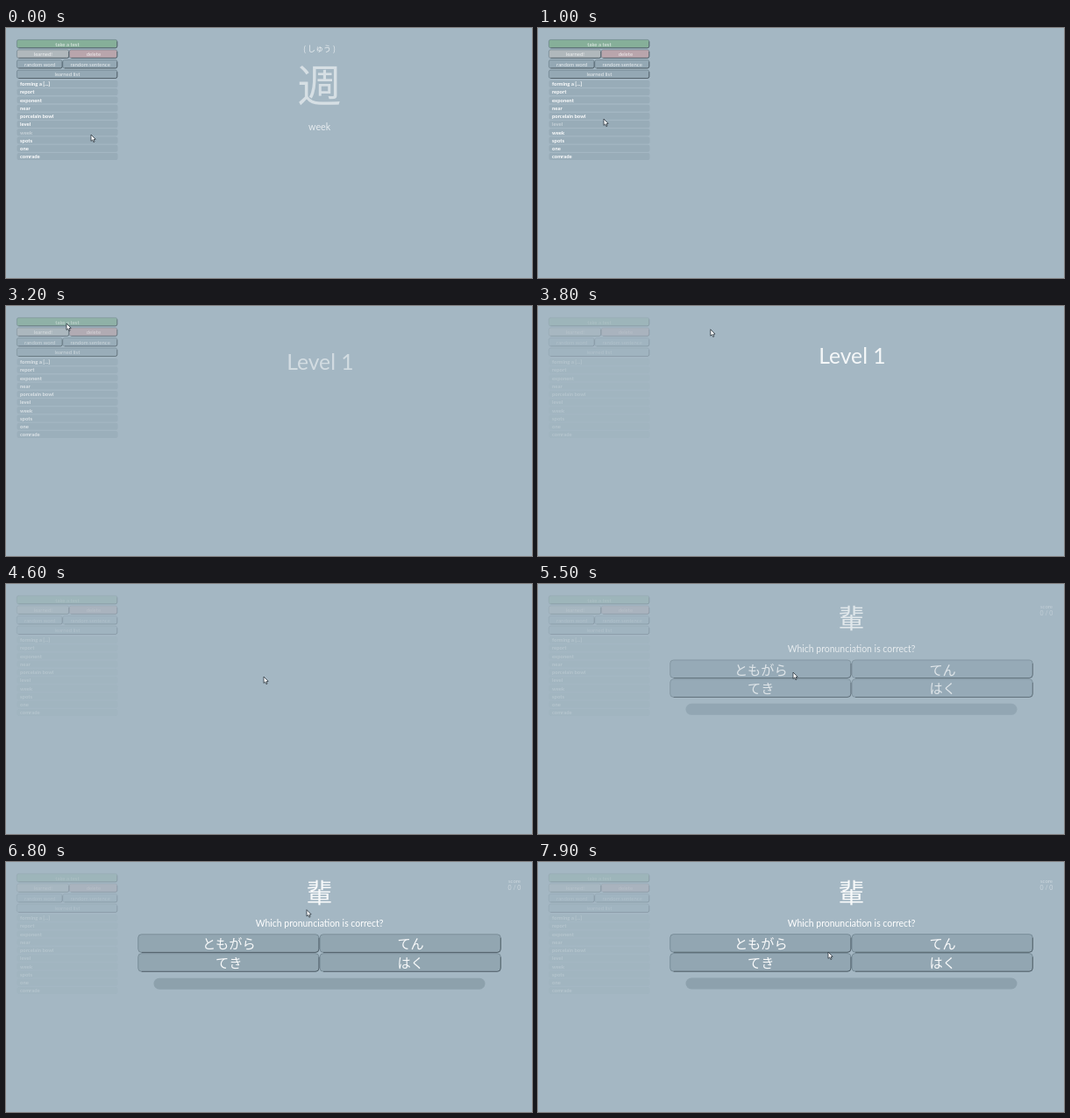
Recreate the animation shown at these times as an HTML page with a canvas. Size 600 by 286 pixels, loop 8000 ms.

```html
<!DOCTYPE html>
<html lang="ja">
<head>
<meta charset="utf-8">
<title>Kanji trainer</title>
<style>
html, body { margin: 0; width: 100%; height: 100%; overflow: hidden; background: #a4b7c3; }
canvas { display: block; width: 600px; height: 286px; }
</style>
</head>
<body>
<canvas id="stage"></canvas>
<script>
const W = 600, H = 286, LOOP = 8000, STEP = 100;
const MID = 357.6;
const LATIN = 'Lato, "Open Sans", sans-serif';
const CJK = '"Noto Sans CJK JP", "Noto Sans CJK", sans-serif';
const SLATE = '#94a8b4';
const canvas = document.getElementById('stage');
const ctx = canvas.getContext('2d');
const ratio = window.devicePixelRatio || 1;
canvas.width = W * ratio;
canvas.height = H * ratio;

const clamp = v => Math.max(0, Math.min(1, v));
const mix = (a, b, k) => a + (b - a) * k;

const menu = [
  [['take a test', '#86af99']],
  [['learned!', '#b0b8bc'], ['delete', '#b9a5ac']],
  [['random word', SLATE], ['random sentence', SLATE]],
  [['learned list', SLATE]]
];
const rows = ['forming a [...]', 'report', 'exponent', 'near', 'porcelain bowl',
  'level', 'week', 'spots', 'one', 'comrade'];
const answers = ['ともがら', 'てん', 'てき', 'はく'];

// Pointer moves: start, end, goal; a bend goes sideways first, then down
const moves = [
  { from: 0, to: 1000, x: 75, y: 104 },
  { from: 1300, to: 2200, x: 69, y: 20 },
  { from: 3200, to: 4600, x: 294, y: 106, bend: 2 },
  { from: 5000, to: 5500, x: 291, y: 101 },
  { from: 5500, to: 6100, x: 338, y: 61 },
  { from: 6500, to: 7400, x: 353, y: 42 },
  { from: 7500, to: 7900, x: 331, y: 103 }
];

function pointerAt(t) {
  let x = 97, y = 122;
  for (const m of moves) {
    const k = clamp((t - m.from) / (m.to - m.from));
    const bend = m.bend || 0;
    x = mix(x, m.x, 1 - (1 - k) ** (1 + bend / 4));
    y = mix(y, m.y, k ** (1 + bend));
  }
  return [x, y];
}

function text(str, x, y, size, { font = LATIN, weight = 400, alpha = 1, align = 'center' } = {}) {
  ctx.font = `${weight} ${size}px ${font}`;
  ctx.textAlign = align;
  ctx.fillStyle = `rgba(255,255,255,${alpha})`;
  ctx.fillText(str, x, y);
}

const kana = (str, x, y, size, alpha) =>
  text(str, x, y, size, { font: CJK, weight: 300, alpha });

function box(x, y, w, h, r, fill) {
  ctx.beginPath();
  ctx.roundRect(x, y, w, h, r);
  ctx.fillStyle = fill;
  ctx.fill();
}

function button(x, y, w, h, r, fill) {
  box(x, y, w, h, r, fill);
  ctx.lineWidth = 0.7;
  ctx.strokeStyle = 'rgba(72,92,102,.55)';
  ctx.stroke();
  // Darker lower and right edges
  ctx.beginPath();
  ctx.moveTo(x + r, y + h);
  ctx.arcTo(x + w, y + h, x + w, y, r);
  ctx.lineTo(x + w, y + r);
  ctx.lineWidth = 0.8;
  ctx.strokeStyle = '#4b5961';
  ctx.stroke();
}

// Fades in while rising and fades out while sinking
function scene(t, start, end, draw) {
  const age = (t - start) / 1000;
  const out = clamp((t - end) / 400);
  if (age <= 0 || out >= 1) return;
  ctx.save();
  ctx.globalAlpha = (1 - Math.exp(-age / 0.42)) * (1 - out);
  ctx.translate(0, 19 * Math.exp(-age / 0.37) + 12 * out * out);
  draw();
  ctx.restore();
}

function word(reading, kanji, meanings) {
  kana(`( ${reading} )`, MID, 22.4, 9, 1);
  text(kanji, MID, 79.5, 50, { font: CJK, alpha: 0.75 });
  meanings.forEach((m, i) => text(m, MID, 113 + i * 13.4, 10.7));
}

function question() {
  text('輩', MID, 46, 30, { font: CJK, alpha: 0.92 });
  text('Which pronunciation is correct?', MID, 74, 10.45);
  answers.forEach((answer, i) => {
    const x = 150.7 + (i % 2) * 207.3;
    const y = 82.6 + (i >> 1) * 21.9;
    button(x, y, 206.3, 20.7, 4, '#92a6b2');
    kana(answer, x + 103.6, y + 16.7, 15.2, 0.95);
  });
  box(168.5, 132.5, 378, 13, 6.5, '#8da1ad');
  text('score', 580, 24, 6, { alpha: 0.45 });
  text('0 / 0', 580, 32, 7, { alpha: 0.45 });
}

function sidebar(t) {
  ctx.save();
  ctx.globalAlpha = 1 - 0.78 * clamp((t - 2800) / 900);
  ctx.font = `400 6px ${LATIN}`;
  menu.forEach((line, n) => {
    // Each button takes its label's width plus an equal share of the spare room
    const widths = line.map(([label]) => ctx.measureText(label).width);
    const spare = (115 - widths.reduce((a, b) => a + b)) / line.length;
    const y = 13.4 + n * 11.57;
    let x = 12.4;
    line.forEach(([label, fill], i) => {
      const w = widths[i] + spare;
      button(x, y, w - 0.6, 9.4, 2, fill);
      text(label, x + w / 2, y + 7.2, 6, { alpha: 0.8 });
      x += w;
    });
  });
  const hovered = t < 500 ? 'week' : t < 1400 ? 'level' : '';
  rows.forEach((label, i) => {
    const y = 60 + i * 9.22;
    box(12.5, y, 115, 7.9, 2, '#98acb8');
    text(label, 16, y + 6.2, 5.9, { align: 'left', weight: 700, alpha: label === hovered ? 0.45 : 1 });
  });
  ctx.restore();
}

function pointer(x, y) {
  ctx.save();
  ctx.translate(x, y);
  ctx.fillStyle = '#fff';
  ctx.strokeStyle = '#26313a';
  ctx.lineWidth = 0.8;
  const arrow = new Path2D('M0 0V7.4L1.7 5.9 2.9 8.6 4.1 8 3 5.5 5.2 5.3Z');
  ctx.fill(arrow);
  ctx.stroke(arrow);
  ctx.restore();
}

function render(t) {
  ctx.setTransform(ratio, 0, 0, ratio, 0, 0);
  ctx.fillStyle = '#a4b7c3';
  ctx.fillRect(0, 0, W, H);
  sidebar(t);
  scene(t, -560, 600, () => word('しゅう', '週', ['week']));
  scene(t, 1250, 2300, () => word('ち', '値', ['level', 'value']));
  scene(t, 2900, 3950, () => text('Level 1', MID + 0.8, 64.5, 24.7));
  scene(t, 4950, Infinity, question);
  pointer(...pointerAt(t));
}

const begin = performance.now();
function tick() {
  const t = (performance.now() - begin) % LOOP;
  render(Math.floor(t / STEP) * STEP);
  requestAnimationFrame(tick);
}
tick();
</script>
</body>
</html>
```
